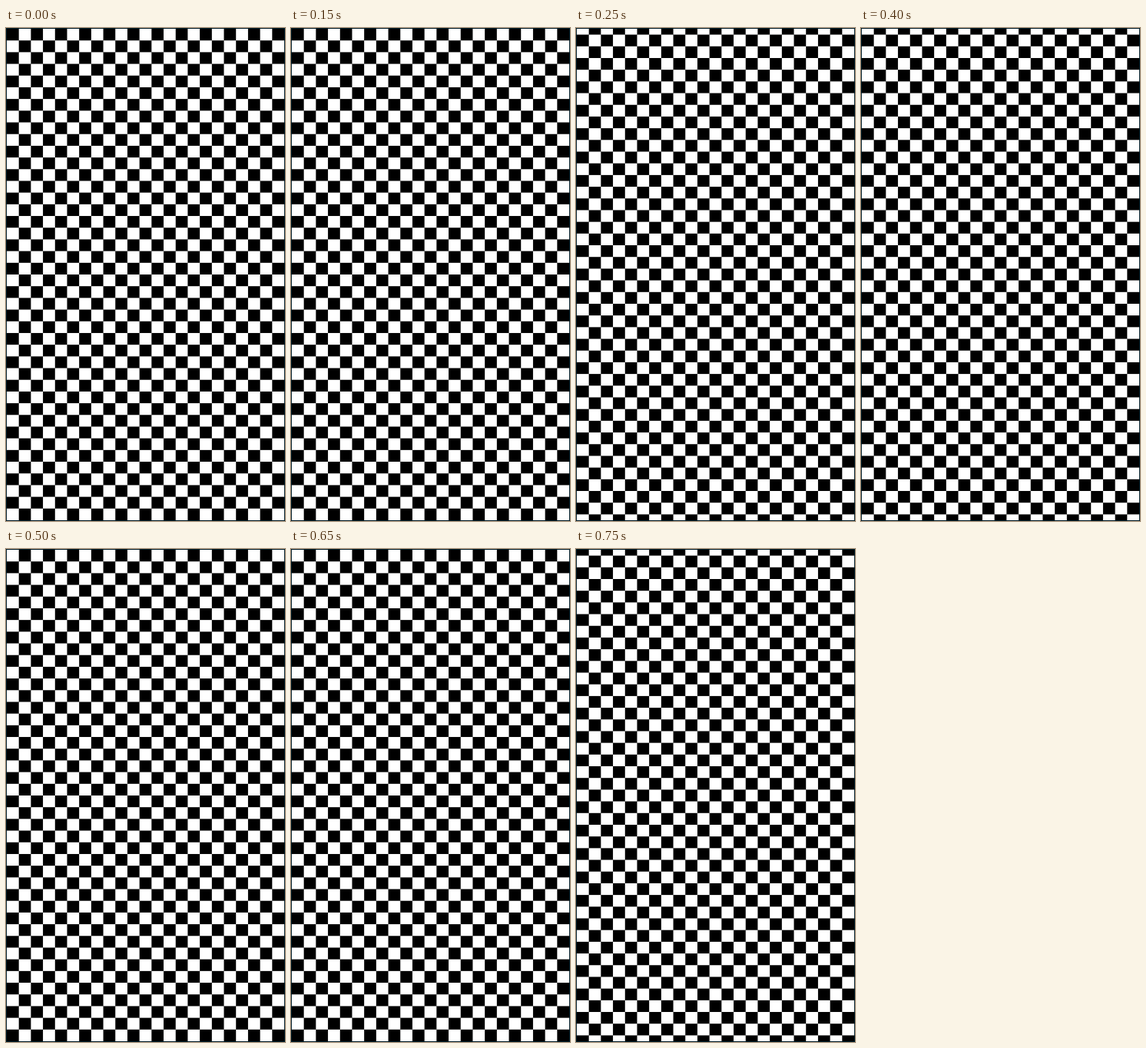
An HTML page with a canvas for the animation above (1000 ms loop, 363 px wide and 640 px high).

```html
<!DOCTYPE html>
<html lang="en">
<head>
<meta charset="utf-8">
<title>Scrolling checkerboard</title>
<style>
html, body { margin: 0; width: 100%; height: 100%; overflow: hidden; background: #000; }
canvas { display: block; }
</style>
</head>
<body>
<canvas id="board" width="363" height="640"></canvas>
<script>
const ctx = document.getElementById("board").getContext("2d");
const W = 363, H = 640, COLS = 23, ROWS = 42;
const cellW = (W - 2) / COLS, cellH = (H - 2) / ROWS;
const STEP = 250, STEPS = 4;

function draw(step) {
  // Each step moves the board down by half a cell.
  const shift = step / 2;
  ctx.fillStyle = "#000";
  ctx.fillRect(0, 0, W, H);
  ctx.fillStyle = "#fff";
  for (let row = -2; row < ROWS; row++) {
    for (let col = (row + 1) & 1; col < COLS; col += 2) {
      ctx.fillRect(1 + col * cellW, 1 + (row + shift) * cellH, cellW, cellH);
    }
  }
  ctx.strokeStyle = "#001c28";
  ctx.strokeRect(0.5, 0.5, W - 1, H - 1);
}

const start = performance.now();
function tick() {
  draw(Math.floor((performance.now() - start) / STEP) % STEPS);
  requestAnimationFrame(tick);
}
tick();
</script>
</body>
</html>
```
